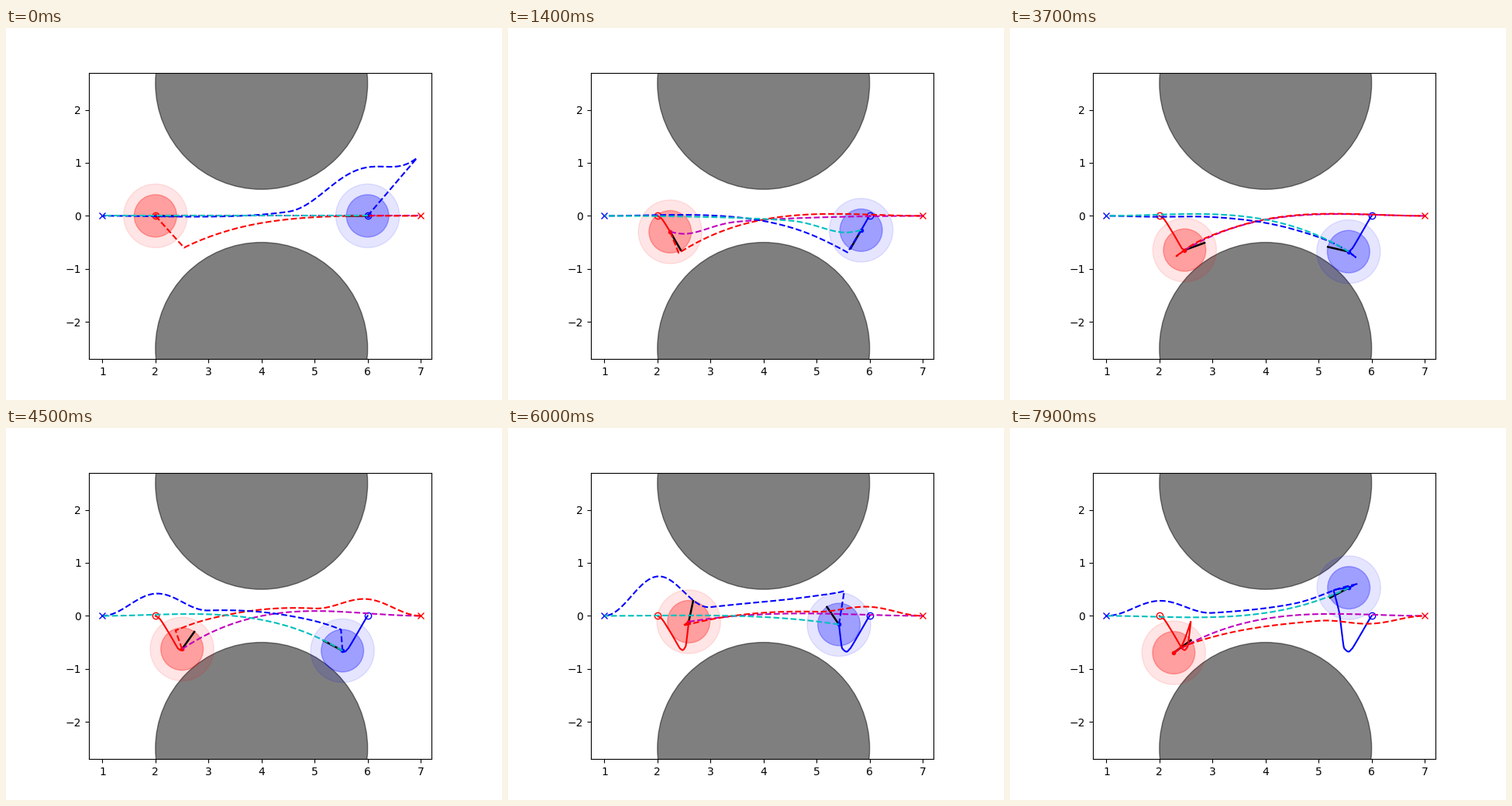
A matplotlib script that plays this animation: 640x480 px, repeating every 8 s.

```python
import numpy as np
import matplotlib.pyplot as plt
from matplotlib.animation import FuncAnimation
from matplotlib.patches import Circle

FRAMES, INTERVAL = 80, 100
COLOR = {"red": "r", "blue": "b"}
GOAL = {"red": 7, "blue": 1}

# step, x, y, heading in degrees
POSES = {
    "red": [(0, 2, 0, 0), (7, 2.07, -.045, -48), (14, 2.24, -.3, -60),
            (22, 2.43, -.62, -37), (37, 2.475, -.645, 20), (52, 2.53, -.58, 74),
            (60, 2.59, -.11, 78), (69, 2.415, -.57, 45), (79, 2.27, -.695, 36)],
    "blue": [(0, 6, 0, 180), (7, 5.985, -.02, 226), (14, 5.84, -.27, 240),
             (22, 5.63, -.62, 230), (37, 5.565, -.675, 167), (52, 5.485, -.615, 141),
             (63, 5.39, .06, 122), (69, 5.285, .475, 142), (79, 5.57, .53, 208)],
}

# step, turning point x and y, bump heights near the robot, midway, near the goal
PLANS = {
    "red": [(0, 2.54, -.6, 0, -.06, 0), (7, 2.47, -.65, -.05, 0, 0),
            (22, 2.32, -.76, .05, 0, 0), (37, 2.32, -.76, .05, 0, 0),
            (52, 2.43, .15, 0, .28, .48), (69, 2.55, -.56, 0, -.14, -.25),
            (79, 2.45, -.58, 0, -.14, -.12)],
    "blue": [(0, 6.93, 1.09, .45, .05, 0), (7, 5.48, -.61, -.08, -.05, 0),
             (22, 5.7, -.78, .05, 0, 0), (37, 5.7, -.78, .05, -.07, -.02),
             (52, 5.32, .2, 0, .26, .72), (69, 5.75, .77, 0, .17, .65),
             (79, 5.72, .6, .1, .1, .27)],
}

# step, bump heights of the path each robot expects of the other
GUESS = {
    "red": [(0, 0, 0), (7, -.35, -.1), (22, 0, 0), (37, 0, 0), (52, 0, .14),
            (69, 0, -.06), (79, 0, 0)],
    "blue": [(0, 0, 0), (7, -.33, -.08), (22, 0, 0), (79, 0, 0)],
}


def pchip(t, y, q):
    """Cubic through the rows of y that does not overshoot."""
    h = np.diff(t)[:, None]
    d = np.diff(y, axis=0) / h
    a, b = d[:-1], d[1:]
    same = a * b > 0
    inner = np.where(same, 2 * a * b / np.where(same, a + b, 1), 0)
    m = np.vstack([d[:1], inner, d[-1:]])
    k = np.clip(np.searchsorted(t, q, "right") - 1, 0, len(t) - 2)
    h = h[k]
    u = (q - t[k])[:, None] / h
    v = 1 - u
    return ((1 + 2 * u) * v**2 * y[k] + (3 - 2 * u) * u**2 * y[k + 1]
            + h * u * v * (v * m[k] - u * m[k + 1]))


def pose(name, steps):
    keys = np.array(POSES[name])
    return pchip(keys[:, 0], keys[:, 1:], np.atleast_1d(steps))


def mix(rows, step):
    """Linear blend of keyframe rows."""
    t, *cols = np.array(rows).T
    return [np.interp(step, t, c) for c in cols]


def bump(x, center, width):
    return np.cos(np.pi / 2 * np.clip((x - center) / width, -1, 1)) ** 2


def route(start, goal, near, mid, far=0):
    """Settle from start onto y = 0 at the goal, with bumps on the way."""
    s = np.linspace(0, 1, 120)
    x0, y0 = start
    x = x0 + s * (goal - x0)
    left = abs(goal - x)
    y = y0 * (1 - s) ** 2 * (1 - 2.2 * s)
    y += np.tanh(12 * s) * (near * bump(left, 4.8, 1.3) + mid * bump(left, 2.7, 2.8)
                            + far * bump(left, 1, 1))
    y[-1] = 0
    return x, y


fig, ax = plt.subplots(figsize=(6.4, 4.8), dpi=100)
ax.set_aspect("equal")
ax.set_xlim(.745, 7.205)
ax.set_ylim(-2.7, 2.7)

for y in (2.5, -2.5):
    ax.add_patch(Circle((4, y), 2, color="k", alpha=.5))

bodies, heads, trails, dots, plans, guesses = ({} for _ in range(6))
for name, color in COLOR.items():
    bodies[name] = [ax.add_patch(Circle((0, 0), r, color=color, alpha=a))
                    for r, a in ((.6, .1), (.4, .3))]
    ax.plot(*POSES[name][0][1:3], "o", color=color, mfc="none")
    ax.plot(GOAL[name], 0, "x", color=color)
    heads[name], = ax.plot([], [], "k", lw=1.8)
    trails[name], = ax.plot([], [], color=color)
    dots[name], = ax.plot([], [], ".", color=color)

guesses["red"], = ax.plot([], [], "m--")
for name, color in COLOR.items():
    plans[name], = ax.plot([], [], "--", color=color)
guesses["blue"], = ax.plot([], [], "c--")


def draw(step):
    for name, goal in GOAL.items():
        x, y, deg = pose(name, step)[0]
        for body in bodies[name]:
            body.center = x, y
        a = np.radians(deg)
        heads[name].set_data([x, x + .4 * np.cos(a)], [y, y + .4 * np.sin(a)])
        trail = pose(name, np.linspace(0, step, 2 * step + 1))
        trails[name].set_data(trail[:, 0], trail[:, 1])
        dots[name].set_data([x], [y])

        guesses[name].set_data(*route((x, y), goal, *mix(GUESS[name], step)))
        tx, ty, *bumps = mix(PLANS[name], step)
        px, py = route((tx, ty), goal, *bumps)
        plans[name].set_data(np.r_[x, px], np.r_[y, py])
    return ()


anim = FuncAnimation(fig, draw, frames=FRAMES, interval=INTERVAL,
                     init_func=lambda: draw(0), repeat=True, repeat_delay=0)
plt.show()
```
